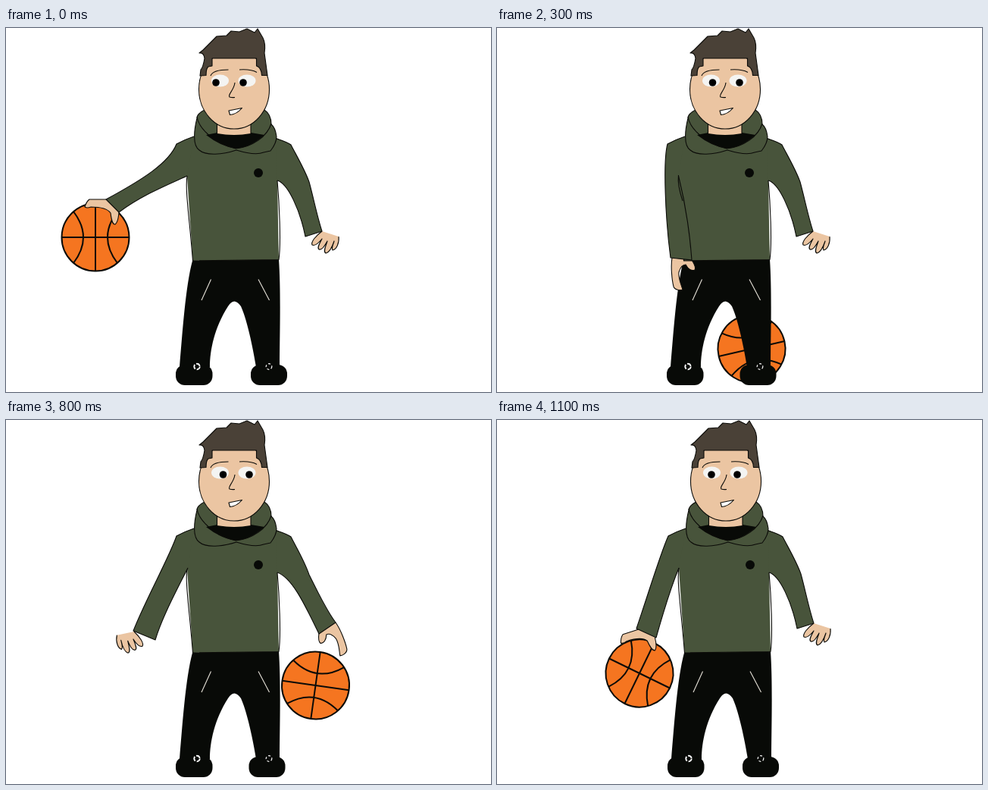
An HTML page for the animation above (1200 ms loop, 640 px wide and 480 px high).

```html
<!DOCTYPE html>
<html lang="en">
<head>
<meta charset="utf-8">
<title>Dribble</title>
<style>
  html, body { margin: 0; width: 100%; height: 100%; overflow: hidden; background: #fff; }
  svg { display: block; width: 100vw; height: 100vh; }
  .line { fill: none; stroke: #0b0b08; stroke-width: 1.1; stroke-linejoin: round; }
  .skin { fill: #ebc5a2; }
  .cloth { fill: #48543b; }
  .hair { fill: #4a4137; }
  .dark { fill: #080a07; }
  .white { fill: #f4f4f2; }
  .pocket { fill: none; stroke: #e6e2d8; stroke-width: 1.1; }
  .seam { fill: none; stroke: #0b0b08; stroke-width: 2; }
  .ring { fill: none; stroke: #fff; }
</style>
</head>
<body>
<svg viewBox="0 0 640 480">
  <defs>
    <path id="grip" d="M0 0L-22 0Q-26 3-28 10Q-25 12-20 10C-10 10 2 12 6 18C7 26 8 33 12 33Q16 30 17 17"/>
    <path id="drop" d="M0 0C-2 12 0 30 2 38C4 43 11 43 14 42C12 35 8 27 9 19Q12 9 18 9C21 15 26 18 30 16Q32 12 26 3"/>
    <path id="rest" d="M22 7C23 16 19 24 14 25C12 22 15 17 16 13C13 22 10 28 5 29C1 27 5 20 7 13C3 20 0 25-4 24C-7 22-3 16 0 10C-4 15-9 20-13 18C-15 14-8 6 0 0"/>
  </defs>
  <g id="scene">
    <g id="ball">
      <circle r="44.5" fill="#f57520" stroke="#0b0b08" stroke-width="2"/>
      <path class="seam" d="M-44.5 0H44.5M0-44.5V44.5M-29-34Q-3 0-29 34M29-34Q3 0 29 34"/>
    </g>

    <path class="dark" d="M246 307L360 305C363 350 361 410 361 446L330 447C324 410 316 380 310 367Q301 354 293 367C275 395 269 425 269 447L229 447C233 400 237 340 246 307Z"/>
    <rect class="dark" x="224" y="444" width="48.500" height="27" rx="12"/>
    <rect class="dark" id="foot" x="323" y="444" width="48" height="27" rx="12"/>
    <path class="pocket" d="M270.500 331.500L258 359M333 331.500L347.500 359"/>
    <circle class="ring" cx="252" cy="446.500" r="3.700" stroke-width="1.900" stroke-dasharray="6 2"/>
    <circle class="ring" cx="347" cy="446.500" r="3.800" stroke-width="1.200" stroke-dasharray="3 2.500"/>

    <use id="handL" class="line" style="fill:#ebc5a2"/>
    <use id="handR" class="line" style="fill:#ebc5a2"/>

    <path class="cloth" d="M248 143L225 153L239 196L246.500 307L360 305.500L358 201L376 154L357 145Z"/>
    <path class="line" d="M239 195C236 212 242 250 246.500 307L360 305.500C363 285 361 235 358 201"/>
    <path class="line" id="armL" style="fill:#48543b"/>
    <path class="line" id="armR" style="fill:#48543b"/>
    <path class="line" id="crease" d="M239.500 194C238 205 241 216 245 228"/>
    <circle class="dark" cx="333" cy="191" r="6"/>

    <path class="line" style="fill:#48543b" d="M262 108Q252 113 252 119C248 135 246 155 255 161C264 169 286 167 304 161C317 165 330 168 340 164L349 162C353 157 357 150 357 143C356 136 354 130 350 127Q350 114 341 108Z"/>
    <path class="dark" d="M264 141L279 138Q301 144 323 138L341 141Q322 158 303 159Q283 156 264 141Z"/>
    <path class="skin" d="M278.500 120H323V139Q301 143 278.500 139Z"/>
    <path class="line" d="M278.500 125V139M323 125V139M252 117C254 131 272 151 303 159C325 157 345 143 350 126"/>

    <ellipse class="line" style="fill:#ebc5a2" cx="301" cy="81" rx="46.500" ry="52"/>
    <path class="line" style="fill:#4a4137" d="M256 63L264 62.500Q264 53 267 51L272 50V40H330.500V50Q337 52 337.500 62.500H345L341 33Q343 21 339 13L332 1L328 6L318 1L308 5L297 4L291 10L278 11L260 29L255 33Q261 32 262 40Q260 52 257 55Z"/>
    <ellipse class="white" cx="282.500" cy="69.500" rx="11.500" ry="8"/>
    <ellipse class="white" cx="318" cy="69.500" rx="11.500" ry="8"/>
    <circle id="eyeL" cy="72" r="4.800"/>
    <circle id="eyeR" cy="72" r="4.800"/>
    <path class="line" d="M270 63Q273 55 293.500 55M308 55Q323 54 331 58.500M302 72C301 82 292 88 295 91Q298 92 302 91.500"/>
    <path class="line" style="fill:#fff" d="M294 109L311.500 105.500Q304 114 295.500 114.500Z"/>
  </g>
</svg>
<script>
const STEP = 100, STEPS = 12;
const el = id => document.getElementById(id);
const mix = (a, b) => a.map((v, i) => (v + b[i]) / 2);

// Each arm: outer edge curve to the cuff, cuff, inner edge curve to the armpit.
const left = {
  wide: [215,178, 180,200, 132,226, 149,243, 180,220, 215,206, 239,195],
  low: [215,175, 200,225, 183,275, 209,287, 218,255, 228,222, 239,195],
  down: [219,175, 222,250, 229,303, 257,306, 254,265, 247,225, 239.5,195],
  out: [215,182, 185,235, 168,278, 197,290, 206,260, 225,225, 240,195]
};
left.lower = mix(left.low, left.down);

// The right arm also passes through its elbow.
const right = {
  rest: [382,166, 394,186, 400,203, 406,225, 411,250, 417,268, 395,275, 388,240, 372,205, 358,201],
  drop: [382,166, 394,186, 400,204, 412,228, 422,250, 435,267, 413,282, 395,245, 378,208, 358,201],
  wide: [400,168, 420,182, 424,188, 440,200, 460,222, 479,236, 455,249, 435,228, 405,192, 358,195]
};
right.mid = mix(right.wide, right.drop);

const handOut = ["rest", 169, 279, 6, -1];
const handRest = ["rest", 417, 268, 0, 1];

// From the left end of the dribble to the right end.
const poses = [
  { ball: [118,276,0], eyes: [277,313], foot: 0, armL: "wide", handL: ["grip",132,226,0,1], armR: "rest", handR: handRest },
  { ball: [187,334,26], eyes: [282,316], foot: 0, armL: "low", handL: ["grip",186,276,-18,1], armR: "rest", handR: handRest },
  { ball: [261,379,51], eyes: [283,318], foot: -1.3, armL: "lower", handL: ["drop",208,290,11,1], armR: "rest", handR: handRest },
  { ball: [336,423,77], eyes: [284.5,320], foot: -2.5, armL: "down", handL: ["drop",231,303,0,1], armR: "rest", handR: handRest },
  { ball: [408.5,350,98], eyes: [286.5,321], foot: -2.5, armL: "out", handL: handOut, armR: "drop", handR: ["drop",435,267,-26,-1] },
  { ball: [440,320,116], eyes: [286.5,321], foot: -2.5, armL: "out", handL: handOut, armR: "mid", handR: ["grip",457,252,21,-1] },
  { ball: [472,291,135], eyes: [286.5,321], foot: -2.5, armL: "out", handL: handOut, armR: "wide", handR: ["grip",479,236,21,-1] }
];
const sway = { 9: 2, 10: 1.5, 11: 1 };

function setHand(id, [shape, x, y, turn, flip]) {
  el(id).setAttribute("href", "#" + shape);
  el(id).setAttribute("transform", `translate(${x} ${y}) rotate(${turn}) scale(${flip} 1)`);
}

function draw(step) {
  const pose = poses[Math.min(step, STEPS - step)];
  const [x, y, turn] = pose.ball;
  const l = left[pose.armL], r = right[pose.armR];
  el("scene").setAttribute("transform", `translate(${sway[step] || 0} 0)`);
  el("ball").setAttribute("transform", `translate(${x} ${y}) rotate(${turn})`);
  el("foot").setAttribute("x", 323 + pose.foot);
  el("eyeL").setAttribute("cx", pose.eyes[0]);
  el("eyeR").setAttribute("cx", pose.eyes[1]);
  el("armL").setAttribute("d", `M248 143Q236 147 225 153C${l.slice(0, 6)}L${l.slice(6, 8)}C${l.slice(8)}`);
  el("armR").setAttribute("d", `M357 146Q370 150 376 154C${r.slice(0, 12)}L${r.slice(12, 14)}C${r.slice(14)}`);
  el("crease").style.display = pose.armL === "down" ? "" : "none";
  setHand("handL", pose.handL);
  setHand("handR", pose.handR);
}

let shown = -1;
function tick() {
  const step = Math.floor(performance.now() / STEP) % STEPS;
  if (step !== shown) draw(shown = step);
  requestAnimationFrame(tick);
}
tick();
</script>
</body>
</html>
```
